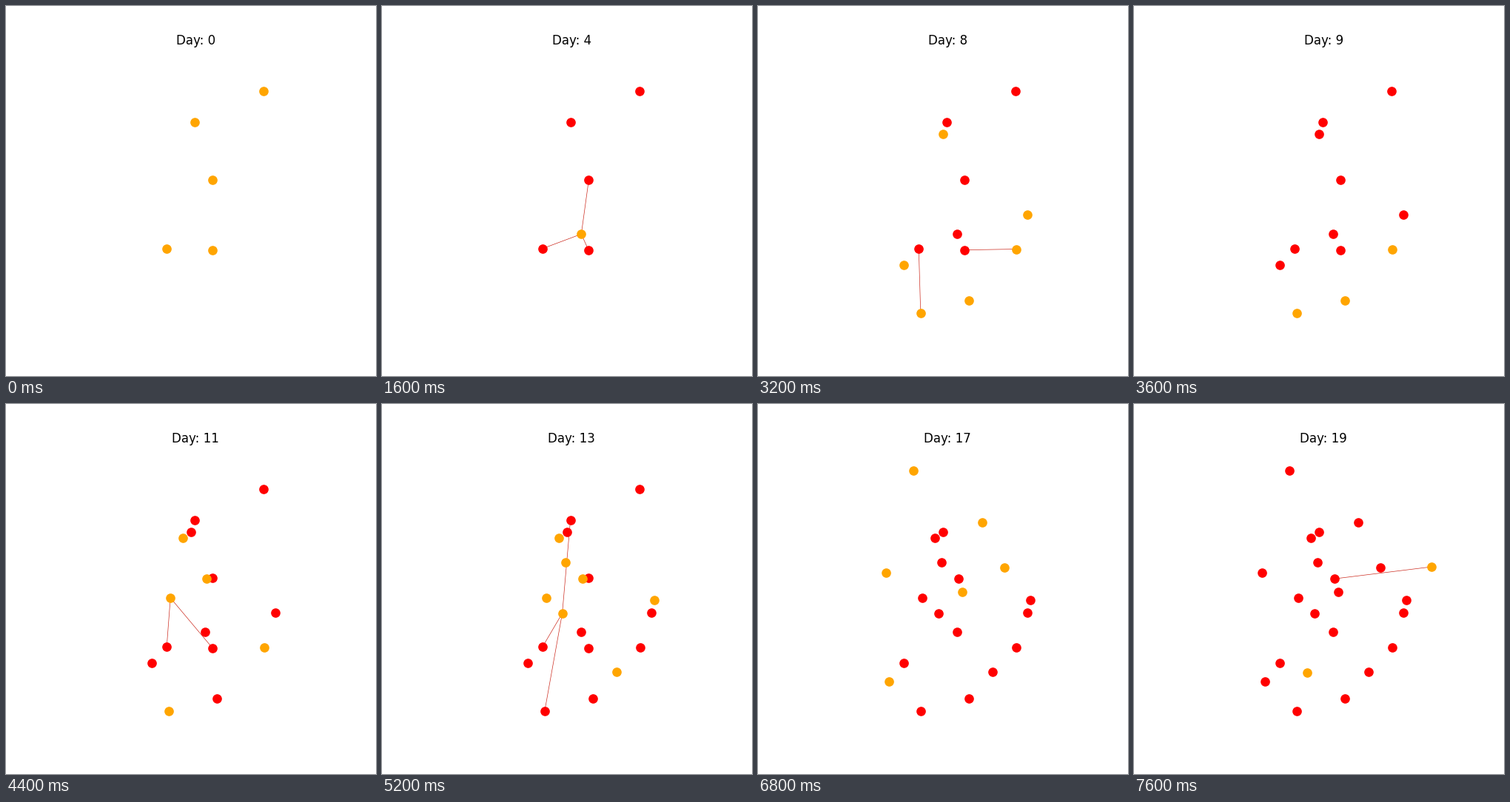
Write a matplotlib script that moves like this. It is 500x500 px and loops after 8000 ms.

```python
import matplotlib.pyplot as plt
from matplotlib.animation import FuncAnimation

SIZE, DPI, DAYS, INTERVAL = 500, 100, 20, 400
RECOVERY = 14
EXPOSED, INFECTIOUS, CONTACT = "orange", "red", "#cc2a1e"

# name: x, y, day exposed, day infectious, people met on the day of exposure
PEOPLE = {
    "A": (347.5, 115, 0, 3, ""),
    "B": (254.6, 157, 0, 3, ""),
    "C": (279.4, 235, 0, 3, ""),
    "D": (217.2, 327.7, 0, 3, ""),
    "E": (279, 329.7, 0, 3, ""),
    "F": (269.3, 308.2, 4, 8, "CDE"),
    "G": (363.6, 281.5, 5, 9, "C"),
    "H": (249.8, 173, 6, 9, "AE"),
    "I": (196.8, 350.4, 5, 9, "D"),
    "J": (285.3, 398.1, 6, 10, "E"),
    "K": (219.8, 415.1, 8, 12, "D"),
    "L": (349.3, 328.5, 8, 12, "E"),
    "M": (243.6, 282.8, 13, 17, "BDK"),
    "N": (239.1, 180.6, 10, 14, "C"),
    "O": (247.8, 214, 12, 16, "C"),
    "P": (270.7, 236.2, 10, 14, "E"),
    "Q": (222.2, 262, 11, 15, "DE"),
    "R": (368.4, 264.5, 12, 16, "E"),
    "S": (316.5, 362.2, 12, 16, "I"),
    "T": (210.3, 90.4, 14, 18, "B"),
    "U": (275.9, 253.6, 14, 18, "J"),
    "V": (177.2, 374.6, 15, 19, "KL"),
    "W": (173.2, 228.3, 16, 19, "K"),
    "X": (302.9, 160, 16, 19, "C"),
    "Y": (332.5, 221.2, 16, 19, "L"),
    "Z": (402.3, 220, 19, 23, "P"),
    "a": (233.5, 362.7, 18, 22, "M"),
}

fig = plt.figure(figsize=(SIZE / DPI, SIZE / DPI), dpi=DPI, facecolor="white")
ax = fig.add_axes([0, 0, 1, 1])
ax.set(xlim=(0, SIZE), ylim=(SIZE, 0))
ax.axis("off")
title = fig.text(0.5125, 0.88 + 6 / 72 * DPI / SIZE, "", ha="center",
                 va="baseline", fontsize=12, family="DejaVu Sans")

dots, links = {}, []
for name, (x, y, start, _, met) in PEOPLE.items():
    dots[name], = ax.plot(x, y, "o", ms=9.1, mew=0, zorder=3)
    for other in met:
        ox, oy = PEOPLE[other][:2]
        line, = ax.plot([x, ox], [y, oy], color=CONTACT, lw=0.5, zorder=2)
        links.append((start, line))


def update(day):
    title.set_text(f"Day: {day}")
    for name, (_, _, exposed, infectious, _) in PEOPLE.items():
        dots[name].set_visible(exposed <= day < infectious + RECOVERY)
        dots[name].set_color(INFECTIOUS if day >= infectious else EXPOSED)
    for start, line in links:
        line.set_visible(day == start)
    return [title, *dots.values(), *(line for _, line in links)]


anim = FuncAnimation(fig, update, frames=DAYS, interval=INTERVAL,
                     repeat=True, repeat_delay=0)
plt.show()
```
